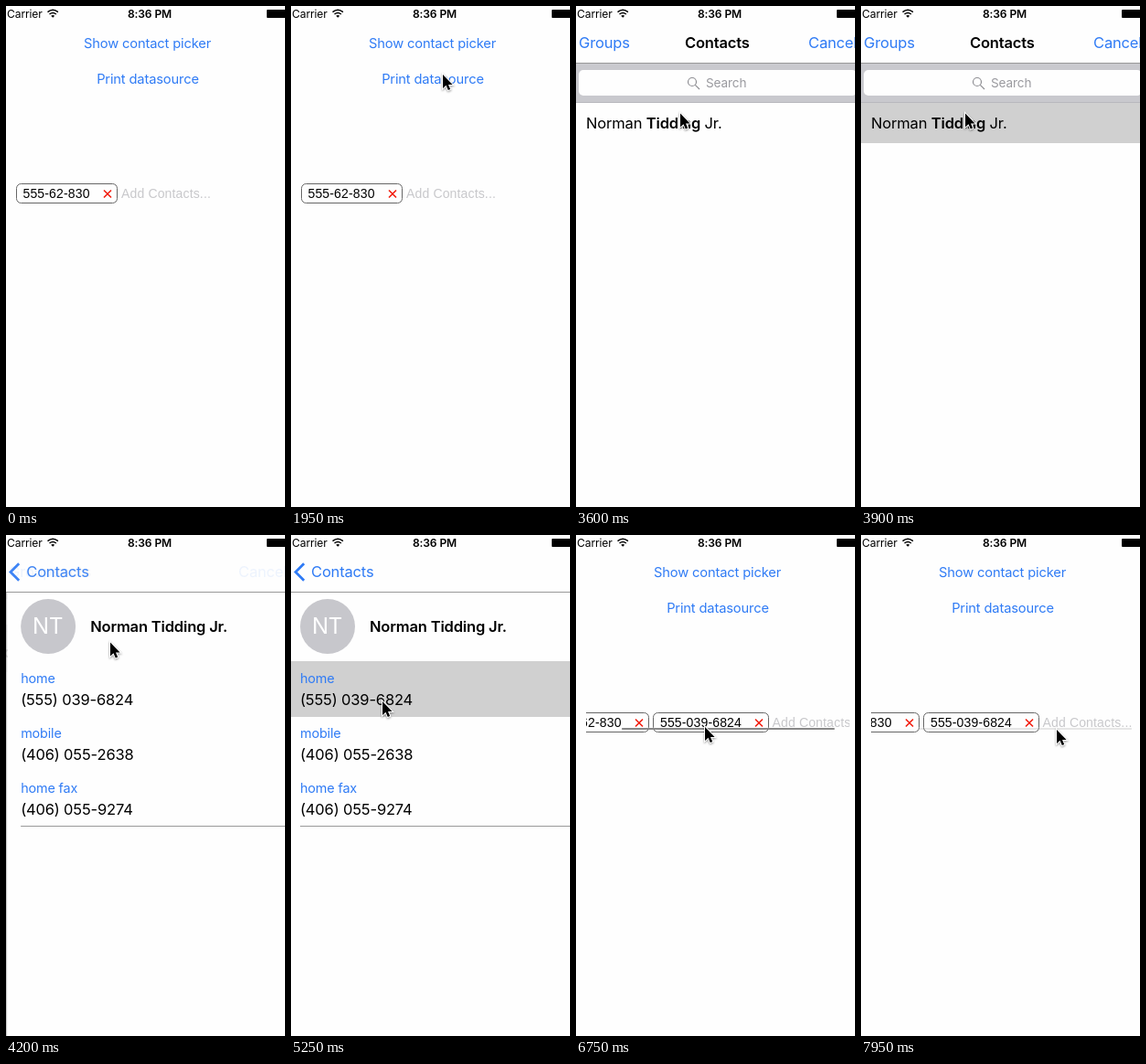
These frames come from a looping animation (305 by 548 pixels, 8000 ms). An HTML page:

```html
<!DOCTYPE html>
<html lang="en">
<head>
<meta charset="utf-8">
<title>Contact picker</title>
<style>
  html, body { margin: 0; width: 100%; height: 100%; overflow: hidden; background: #fefefe; }
  svg { display: block; width: 305px; height: 548px; }
  text { font: 16.5px Inter, Roboto, sans-serif; letter-spacing: -.01em; white-space: pre; }
  .bold { font-weight: 600; }
  .blue { fill: #2f7bf5; }
  .link { font-size: 14.7px; text-anchor: middle; }
  .label { font-size: 14.4px; }
  .status { font-size: 12.1px; }
  .search { font-size: 13.6px; }
  .initials { font-size: 24px; text-anchor: middle; }
  .field text { font: 14px "Liberation Sans", Arial, sans-serif; letter-spacing: .15px; }
  .chip rect { fill: #fefefe; stroke: #666; }
  .chip path { stroke: #f21c0d; stroke-width: 1.6; }
  .page { fill: #fefefe; }
  .mark { fill: #d0d0d0; }
  .rule { fill: #999; }
  #cursor { filter: drop-shadow(0 1px 1px #0006); }
</style>
</head>
<body>
<svg viewBox="0 0 305 548">
  <defs>
    <clipPath id="fieldClip"><rect x="11" y="190" width="288" height="30"/></clipPath>
    <clipPath id="bodyClip"><rect y="63" width="305" height="485"/></clipPath>
  </defs>
  <rect class="page" width="305" height="548"/>

  <g id="home">
    <text class="link blue" id="pick" x="154.5" y="46">Show contact picker</text>
    <text class="link blue" x="155" y="84.5">Print datasource</text>
    <g class="field" clip-path="url(#fieldClip)">
      <g id="chips">
        <g class="chip">
          <rect x="11.5" y="194.5" width="110" height="21" rx="5"/>
          <text x="18.5" y="210">555-62-830</text>
          <path d="M107 201.5l8 8m0-8l-8 8"/>
        </g>
        <g class="chip" id="newChip">
          <rect x="126.5" y="194.5" width="126" height="21" rx="5"/>
          <text x="134" y="210">555-039-6824</text>
          <path d="M238 201.5l8 8m0-8l-8 8"/>
        </g>
        <text id="hint" y="209.5" fill="#c8c8cb">Add Contacts...</text>
      </g>
      <rect id="bar" y="211" width="233" height="2" rx="1" fill="#888"/>
    </g>
  </g>

  <g id="modal">
    <rect class="page" x="-5" width="320" height="548"/>
    <g clip-path="url(#bodyClip)">
      <g id="list">
        <rect x="-5" y="63" width="320" height="42.5" fill="#c9c9ce"/>
        <rect x="-5" y="105" width="320" height="1" fill="#b8b8bd"/>
        <rect x="3" y="70" width="304" height="28" rx="5" fill="#fefefe"/>
        <g fill="none" stroke="#8e8e93" stroke-width="1.2">
          <circle cx="127" cy="83" r="4.5"/><path d="M130.3 86.3l4.7 4.7"/>
        </g>
        <text class="search" x="142" y="89" fill="#9a9a9f">Search</text>
        <rect class="mark" id="rowMark" x="-5" y="106" width="320" height="44"/>
        <text x="11" y="134">Norman <tspan class="bold">Tidding</tspan> Jr.</text>
      </g>
      <g id="detail">
        <rect class="page" x="-5" y="63" width="320" height="485"/>
        <rect x="-6" y="63" width="1" height="485" fill="#c4c4c4"/>
        <circle cx="40" cy="100" r="30" fill="#c7c7cc"/>
        <text class="initials" x="39.5" y="108" fill="#fff">NT</text>
        <text class="bold" x="86" y="106">Norman Tidding Jr.</text>
        <rect class="mark" id="phoneMark" x="-5" y="138" width="320" height="61"/>
        <g id="phones"></g>
        <rect class="rule" x="10" y="318" width="305" height="1"/>
      </g>
    </g>
    <rect class="rule" y="62" width="305" height="1"/>
    <g id="listNav">
      <text class="blue" x="3" y="46">Groups</text>
      <text class="blue" x="254" y="46">Cancel</text>
    </g>
    <text class="bold" id="title" y="46">Contacts</text>
    <g id="backNav">
      <path d="M14.2 31.2L5 40.5l9.2 9.3" fill="none" stroke="#2f7bf5" stroke-width="2.8"/>
      <text class="blue" id="back" y="46">Contacts</text>
    </g>
  </g>

  <g>
    <text class="status" x="1" y="12.5">Carrier</text>
    <path d="M45.5 6.6q5.7-4.8 11.4 0M47.5 9q3.7-3 7.400 0" fill="none" stroke="#000" stroke-width="1.5"/>
    <path d="M49.2 10.7q2-1.500 4 0l-2 2z"/>
    <text class="status bold" x="157" y="12.5" text-anchor="middle">8:36 PM</text>
    <rect x="285" y="4" width="24" height="9" rx="1"/>
  </g>

  <path id="cursor" d="M0 1v15l3.500-3.200 2.300 5.200 2.400-1-2.200-5.100h4.600z"
    stroke="#fff" stroke-width="2" paint-order="stroke"/>
</svg>
<script>
const LOOP = 8000, STEP = 150;
const GRIP = 183, SCROLL_MAX = 58, DRAG = 6450, RELEASE = 7050;

const el = id => document.getElementById(id);
const set = (id, attrs) => { for (const k in attrs) el(id).setAttribute(k, attrs[k]); };
const move = (id, x, y) => set(id, { transform: `translate(${x} ${y})` });
const show = (id, on) => set(id, { opacity: +on });

const ramp = (t, from, to) => Math.min(1, Math.max(0, (t - from) / (to - from)));
const smooth = p => p * p * (3 - 2 * p);
const easeOut = (p, power) => 1 - (1 - p) ** power;

// The pointer's trips from its entry point to each thing it uses.
const entry = { x: 101, y: 506 };
const trips = [
  { from: 750, to: 1050, x: 126, y: 309 },
  { from: 1350, to: 1950, x: 166, y: 74 },
  { from: 1950, to: 2250, x: 152, y: 42 },
  { from: 2850, to: 3600, x: 114, y: 116.5 },
  { from: 4350, to: 4650, x: 100, y: 181 },
  { from: 5850, to: 6300, x: GRIP, y: 209 },
  { from: DRAG, to: RELEASE, x: 99, y: 209 },
  { from: RELEASE, to: 7950, x: 214, y: 212 },
];
const pointer = t => trips.reduce((pos, trip) => {
  const p = smooth(ramp(t, trip.from, trip.to));
  return { x: pos.x + (trip.x - pos.x) * p, y: pos.y + (trip.y - pos.y) * p };
}, entry);

// The field follows the drag, gives half way past its end, then springs back.
function scrollAt(t) {
  if (t < DRAG) return 0;
  const pulled = GRIP - pointer(Math.min(t, RELEASE)).x;
  const over = Math.max(0, pulled - SCROLL_MAX) / 2;
  return Math.min(pulled, SCROLL_MAX) + over * (1 - easeOut(ramp(t, RELEASE, RELEASE + 450), 2));
}

const phones = { home: "(555) 039-6824", mobile: "(406) 055-2638", "home fax": "(406) 055-9274" };
el("phones").innerHTML = Object.entries(phones).map(([label, number], i) =>
  `<g transform="translate(10 ${162 + i * 60})">
    <text class="label blue">${label}</text><text y="24">${number}</text></g>`).join("");

function drawHome(t) {
  const added = t >= 5400, scroll = scrollAt(t);
  show("pick", t < 2250 ? 1 : .25 + .75 * ramp(t, 2250, 2550));
  show("newChip", added);
  set("hint", { x: added ? 256.5 : 126 });
  move("chips", -scroll, 0);
  set("bar", { x: 15 + scroll * .83 });
  show("bar", ramp(t, DRAG, DRAG + 150) * (1 - .8 * ramp(t, 7500, 7950)));
}

function drawModal(t) {
  const up = easeOut(ramp(t, 2400, 3000), 3) - smooth(ramp(t, 5250, 5550));
  move("modal", 0, 548 * (1 - up));
  show("modal", up > 0);

  const rest = 1 - easeOut(ramp(t, 3900, 4350), 3.6), fade = rest ** .65;
  move("detail", 320 * rest, 0);
  show("detail", rest < 1);
  move("list", -96 * (1 - rest), 0);
  const titleX = 22 + 97 * rest ** 1.5;
  set("title", { x: titleX });
  show("title", rest < 1 ? fade / 2 : 1);
  set("back", { x: titleX });
  show("listNav", fade);
  show("backNav", 1 - fade);
  show("rowMark", t >= 3900);
  show("phoneMark", t >= 5250);
}

function draw(t) {
  const { x, y } = pointer(t);
  move("cursor", x, y);
  show("cursor", t >= 750);
  drawHome(t);
  drawModal(t);
}

const start = performance.now();
function tick() {
  const t = (performance.now() - start) % LOOP;
  draw(Math.floor(t / STEP) * STEP);
  requestAnimationFrame(tick);
}
tick();
</script>
</body>
</html>
```
